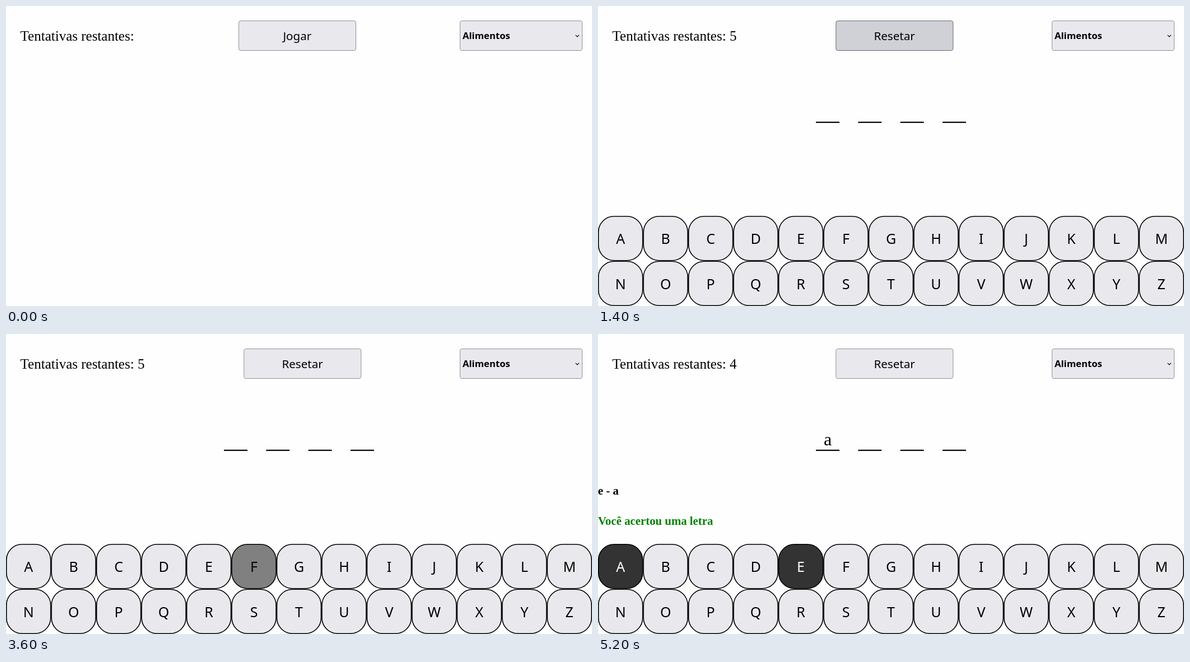
These frames come from a looping animation (1046x536 px, 8 s). An HTML page:

```html
<!DOCTYPE html>
<html lang="pt">
<head>
<meta charset="utf-8">
<title>Jogo da forca</title>
<style>
html, body { margin: 0; width: 100%; height: 100%; overflow: hidden; background: #fefefe; }
svg { display: block; width: 1046px; height: 536px; }
.ui { font-family: "Noto Sans", "Open Sans", sans-serif; }
.serif { font-family: "Liberation Serif", "Times New Roman", serif; }
.mid { text-anchor: middle; }
.bold { font-weight: 700; }
</style>
</head>
<body>
<svg id="stage" viewBox="0 0 1046 536"></svg>
<script>
const LOOP = 8000;
const LETTERS = "ABCDEFGHIJKLMNOPQRSTUVWXYZ";
const stage = document.getElementById("stage");

function add(tag, attrs, label = "", parent = stage) {
  const el = document.createElementNS("http://www.w3.org/2000/svg", tag);
  for (const name in attrs) el.setAttribute(name, attrs[name]);
  el.textContent = label;
  return parent.appendChild(el);
}

function text(x, y, size, cls, label = "", parent = stage) {
  return add("text", { x, y, "font-size": size, class: cls }, label, parent);
}

function box(x, width, parent = stage) {
  return add("rect", {
    x: x + 0.5, y: 26.5, width: width - 1, height: 53, rx: 3.5,
    fill: "#e9e9ed", stroke: "#8f8f9d"
  }, "", parent);
}

const tries = text(25.6, 62, 25, "serif");

const button = add("g", {});
const face = box(415, 210, button);
const caption = text(519.8, 60.5, 20.6, "ui mid", "", button);

box(810, 219);
text(815, 59, 16.7, "ui bold", "Alimentos");
add("path", { d: "M1016.7 51.8l3.1 3.1 3.1-3.1", fill: "none", stroke: "#000", "stroke-width": 1.2 });

const board = add("g", {});
for (let i = 0; i < 4; i++) {
  add("rect", { x: 389 + i * 75.3, y: 206.7, width: 42, height: 2.2 }, "", board);
}
const hit = text(410, 199, 32, "serif mid", "", board);
const used = text(0, 287, 20.8, "serif bold", "", board);
const message = text(0, 341, 20.8, "serif bold", "", board);

const keys = [...LETTERS].map((letter, i) => {
  const size = 1046 / 13;
  const x = (i % 13) * size;
  const y = 375 + Math.floor(i / 13) * 80.5;
  const rect = add("rect", {
    x: x + 0.75, y: y + 0.75, width: size - 1.5, height: size - 1.5,
    rx: 28, stroke: "#000", "stroke-width": 1.6
  }, "", board);
  const label = text(x + size / 2, y + 50.3, 25, "ui mid", letter, board);
  return { letter, rect, label };
});

const BUTTON = {
  idle: ["#e9e9ed", "#8f8f9d"],
  hover: ["#d0d0d7", "#676774"],
  press: ["#b1b1b9", "#484851"]
};

// Each step keeps the values of the one before it.
const STEPS = [
  { at: 0, playing: false, button: "idle", tries: "", hover: "", used: "", hit: "", message: "", color: "red" },
  { at: 1100, button: "hover" },
  { at: 1300, button: "press" },
  { at: 1400, playing: true, button: "hover", tries: " 5" },
  { at: 1500, button: "idle" },
  { at: 2400, hover: "E" },
  { at: 3600, hover: "F" },
  { at: 3700, hover: "", tries: " 4", used: "e", message: "Você errou uma letra" },
  { at: 4400, hover: "C" },
  { at: 4500, hover: "A" },
  { at: 5100, hover: "" },
  { at: 5200, used: "e - a", hit: "a", message: "Você acertou uma letra", color: "green" }
];

function draw(s) {
  const [fill, stroke] = BUTTON[s.button];
  face.setAttribute("fill", fill);
  face.setAttribute("stroke", stroke);
  caption.textContent = s.playing ? "Resetar" : "Jogar";
  button.setAttribute("transform", `translate(${s.playing ? 9.3 : 0} 0)`);
  tries.textContent = "Tentativas restantes:" + s.tries;
  board.setAttribute("visibility", s.playing ? "visible" : "hidden");
  hit.textContent = s.hit;
  used.textContent = s.used;
  message.textContent = s.message;
  message.setAttribute("fill", s.color);
  for (const { letter, rect, label } of keys) {
    const done = s.used.includes(letter.toLowerCase());
    rect.setAttribute("fill", done ? "#333" : letter === s.hover ? "#808080" : "#e9e9ed");
    label.setAttribute("fill", done ? "#fff" : "#000");
  }
}

const start = performance.now();
let shown = -1;

function tick() {
  const t = (performance.now() - start) % LOOP;
  const past = STEPS.filter(step => step.at <= t);
  if (past.length !== shown) {
    shown = past.length;
    draw(Object.assign({}, ...past));
  }
  requestAnimationFrame(tick);
}
tick();
</script>
</body>
</html>
```
